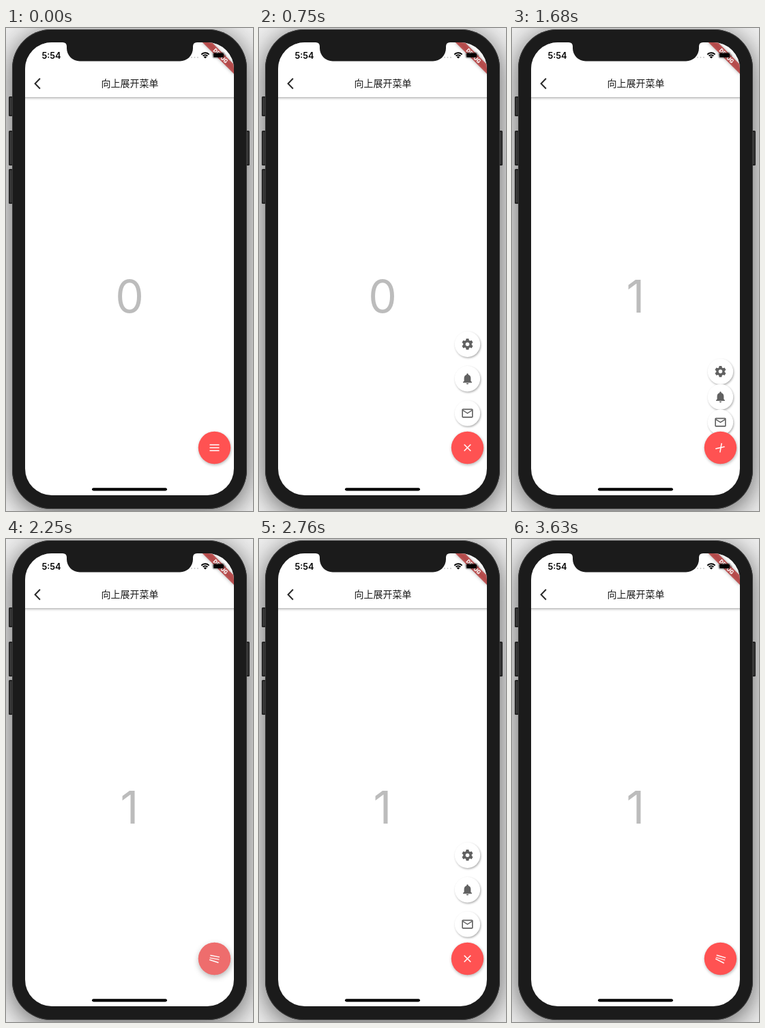
Recreate the animation shown at these times as an HTML page with a canvas. Size 362 by 706 pixels, loop 3660 ms.

```html
<!DOCTYPE html>
<html lang="zh">
<head>
<meta charset="utf-8">
<title>向上展开菜单</title>
<style>
html, body { margin: 0; width: 100%; height: 100%; overflow: hidden; background: #fff; }
canvas { display: block; width: 362px; height: 706px; }
</style>
</head>
<body>
<canvas id="stage"></canvas>
<script>
const W = 362, H = 706, LOOP = 3660;
const canvas = document.getElementById('stage');
const dpr = window.devicePixelRatio || 1;
canvas.width = W * dpr;
canvas.height = H * dpr;
const ctx = canvas.getContext('2d');

const FAB = { x: 305.5, y: 613.5, r: 23.7 };
const OPEN_MS = 300, PICK = 1580;
const TAPS = [180, 2130, 3230];
const BELL = new Path2D('M12 22c1.1 0 2-.9 2-2h-4c0 1.1.89 2 2 2zm6-6v-5c0-3.07-1.64-5.64-4.5-6.32V4c0-.83-.67-1.5-1.5-1.5s-1.5.67-1.5 1.5v.68C7.63 5.36 6 7.92 6 11v5l-2 2v1h16v-1l-2-2z');
const MAIL = new Path2D('M20 4H4c-1.1 0-2 .9-2 2v12c0 1.1.9 2 2 2h16c1.1 0 2-.9 2-2V6c0-1.1-.9-2-2-2zm0 14H4V8l8 5 8-5v10zm-8-7L4 6h16l-8 5z');

const clamp = v => Math.max(0, Math.min(1, v));
const ramp = (t, start, ms) => clamp((t - start) / ms);
const smooth = v => v * v * (3 - 2 * v);

function rounded(x, y, w, h, r, fill) {
  ctx.beginPath();
  ctx.roundRect(x, y, w, h, r);
  ctx.fillStyle = fill;
  ctx.fill();
}

function disc(x, y, r, fill) {
  ctx.beginPath();
  ctx.arc(x, y, r, 0, Math.PI * 2);
  ctx.fillStyle = fill;
  ctx.fill();
}

function label(str, x, y, font, fill) {
  ctx.font = font;
  ctx.fillStyle = fill;
  ctx.textAlign = 'center';
  ctx.fillText(str, x, y);
}

function shadow(color, blur, dx, dy) {
  ctx.shadowColor = color;
  ctx.shadowBlur = blur * dpr;
  ctx.shadowOffsetX = dx * dpr;
  ctx.shadowOffsetY = dy * dpr;
}

function layer(draw) {
  ctx.save();
  draw();
  ctx.restore();
}

function drawBody() {
  ctx.fillStyle = '#f0f0f0';
  ctx.fillRect(0, 0, W, H);
  layer(() => {
    shadow('rgba(0,0,0,.62)', 40, 0, 7);
    rounded(9, 2, 344, 701, 57, '#1b1b1b');
  });
  for (const [x, y, h] of [[4, 100, 29], [4, 150, 51], [4, 206, 51], [351, 150, 51]]) {
    rounded(x, y, 6, h, 1.5, '#232323');
    rounded(x + 1.5, y + 2, 3, h - 4, 1, '#383838');
  }
  rounded(9, 2, 344, 701, 57, '#3a3a3a');
  rounded(10, 3, 342, 699, 56, '#1b1b1b');
}

function drawBanner() {
  layer(() => {
    ctx.translate(334, 21);
    ctx.rotate(Math.PI / 4);
    layer(() => {
      shadow('rgba(0,0,0,.5)', 5, 0, 0);
      ctx.fillStyle = 'rgba(183,28,28,.68)';
      ctx.fillRect(-34, 22.8, 68, 9.8);
    });
    label('DEBUG', 0, 30.7, '900 8.3px Roboto, sans-serif', '#fff');
  });
}

function drawStatus() {
  label('5:54', 66.4, 44.6, '600 12.7px Inter, sans-serif', '#000');
  for (let i = 0; i < 4; i++) disc(267.5 + i * 4.5, 43, 0.9, '#c4c4c4');
  layer(() => {
    ctx.lineWidth = 2;
    ctx.strokeStyle = '#000';
    for (const r of [4.6, 7.7]) {
      ctx.beginPath();
      ctx.arc(292, 44, r, -Math.PI * 0.76, -Math.PI * 0.24);
      ctx.stroke();
    }
    ctx.beginPath();
    ctx.moveTo(292, 44.5);
    ctx.arc(292, 44.5, 3, -Math.PI * 0.76, -Math.PI * 0.24);
    ctx.fillStyle = '#000';
    ctx.fill();
    ctx.beginPath();
    ctx.roundRect(302.5, 35.5, 18, 8.6, 2.6);
    ctx.lineWidth = 0.8;
    ctx.strokeStyle = 'rgba(0,0,0,.4)';
    ctx.stroke();
  });
  rounded(303.8, 36.6, 15.4, 6.4, 1.6, '#000');
  rounded(321.4, 38.4, 1, 3, 0.5, 'rgba(0,0,0,.4)');
}

function drawNotch() {
  ctx.beginPath();
  ctx.moveTo(83, 20);
  ctx.lineTo(83, 21);
  ctx.quadraticCurveTo(89, 21, 89, 27);
  ctx.arcTo(89, 48.5, 110, 48.5, 19);
  ctx.arcTo(274, 48.5, 274, 27, 19);
  ctx.lineTo(274, 27);
  ctx.quadraticCurveTo(274, 21, 280, 21);
  ctx.lineTo(280, 20);
  ctx.fillStyle = '#1b1b1b';
  ctx.fill();
}

function drawAppBar() {
  layer(() => {
    shadow('rgba(0,0,0,.4)', 4, 0, 1.2);
    ctx.fillStyle = '#fff';
    ctx.fillRect(20, 10, 322, 91);
  });
  label('向上展开菜单', 181.4, 86.3, '500 14px "Noto Sans CJK SC", "Noto Sans CJK", sans-serif', '#1c1c1c');
  ctx.beginPath();
  ctx.moveTo(49.9, 73.8);
  ctx.lineTo(42.6, 81.3);
  ctx.lineTo(49.9, 88.8);
  ctx.lineWidth = 2;
  ctx.strokeStyle = '#2a2a2a';
  ctx.stroke();
}

function gear() {
  const ink = '#616161';
  disc(12, 12, 7.6, ink);
  for (let i = 0; i < 6; i++) {
    layer(() => {
      ctx.translate(12, 12);
      ctx.rotate(i * Math.PI / 3);
      ctx.beginPath();
      ctx.moveTo(-3, -6);
      ctx.lineTo(-2.3, -10);
      ctx.lineTo(2.3, -10);
      ctx.lineTo(3, -6);
      ctx.fill();
    });
  }
  disc(12, 12, 3.4, '#fff');
}

const glyph = path => () => {
  ctx.fillStyle = '#616161';
  ctx.fill(path, 'evenodd');
};
const ITEMS = [[151.3, gear], [100.8, glyph(BELL)], [50.4, glyph(MAIL)]];

function drawItem(y, icon) {
  layer(() => {
    shadow('rgba(0,0,0,.32)', 3, 1, 1.5);
    disc(FAB.x, y, 18.7, '#fff');
  });
  layer(() => {
    ctx.translate(FAB.x, y);
    ctx.scale(0.816, 0.816);
    ctx.translate(-12, -12);
    icon();
  });
}

// The bars turn together while closing up into a cross.
function drawMenuIcon(p) {
  const turn = 1 - (1 - p) ** 1.25;
  const gap = 4.2 * (1 - turn) ** 1.5;
  const bar = (side, extra, alpha) => layer(() => {
    ctx.translate(FAB.x, FAB.y);
    ctx.rotate(Math.PI * 0.75 * turn);
    ctx.translate(0, gap * side);
    ctx.rotate(extra * turn);
    ctx.globalAlpha = alpha;
    ctx.fillStyle = '#fff';
    const len = 14 - 0.4 * turn;
    ctx.fillRect(-len / 2, -0.75, len, 1.5);
  });
  bar(-1, 0, 1);
  bar(0, 0, clamp(1 - turn * 2.5));
  bar(1, Math.PI / 2, 1);
}

function drawFab(p, press) {
  layer(() => {
    shadow('rgba(0,0,0,.3)', 4 + 4 * press, 0.6, 1.6 + 1.5 * press);
    disc(FAB.x, FAB.y, FAB.r, '#ff5252');
  });
  disc(FAB.x, FAB.y, FAB.r, `rgba(188,188,188,${0.25 * press})`);
  drawMenuIcon(p);
}

function openness(t) {
  return ramp(t, 312, OPEN_MS) - ramp(t, PICK, OPEN_MS)
    + ramp(t, 2232, OPEN_MS) - ramp(t, 3360, OPEN_MS);
}

function pressure(t) {
  return Math.max(...TAPS.map(s => ramp(t, s, 90) * (1 - ramp(t, s + 130, 180))));
}

function render(t) {
  const p = openness(t);
  ctx.setTransform(dpr, 0, 0, dpr, 0, 0);
  drawBody();
  rounded(28, 21, 306, 662, 39, '#fff');
  layer(() => {
    ctx.beginPath();
    ctx.roundRect(28, 21, 306, 662, 39);
    ctx.clip();
    drawAppBar();
    label(t < PICK ? '0' : '1', 181, 416, '400 66px Inter, sans-serif', '#bcbcbc');
    if (p > 0) for (const [rise, icon] of ITEMS) drawItem(FAB.y - rise * smooth(p), icon);
    drawFab(p, pressure(t));
    drawBanner();
    drawStatus();
  });
  drawNotch();
  rounded(126, 672.2, 110, 4.2, 2.1, '#000');
}

const start = performance.now();
function tick() {
  render((performance.now() - start) % LOOP);
  requestAnimationFrame(tick);
}
tick();
</script>
</body>
</html>
```
